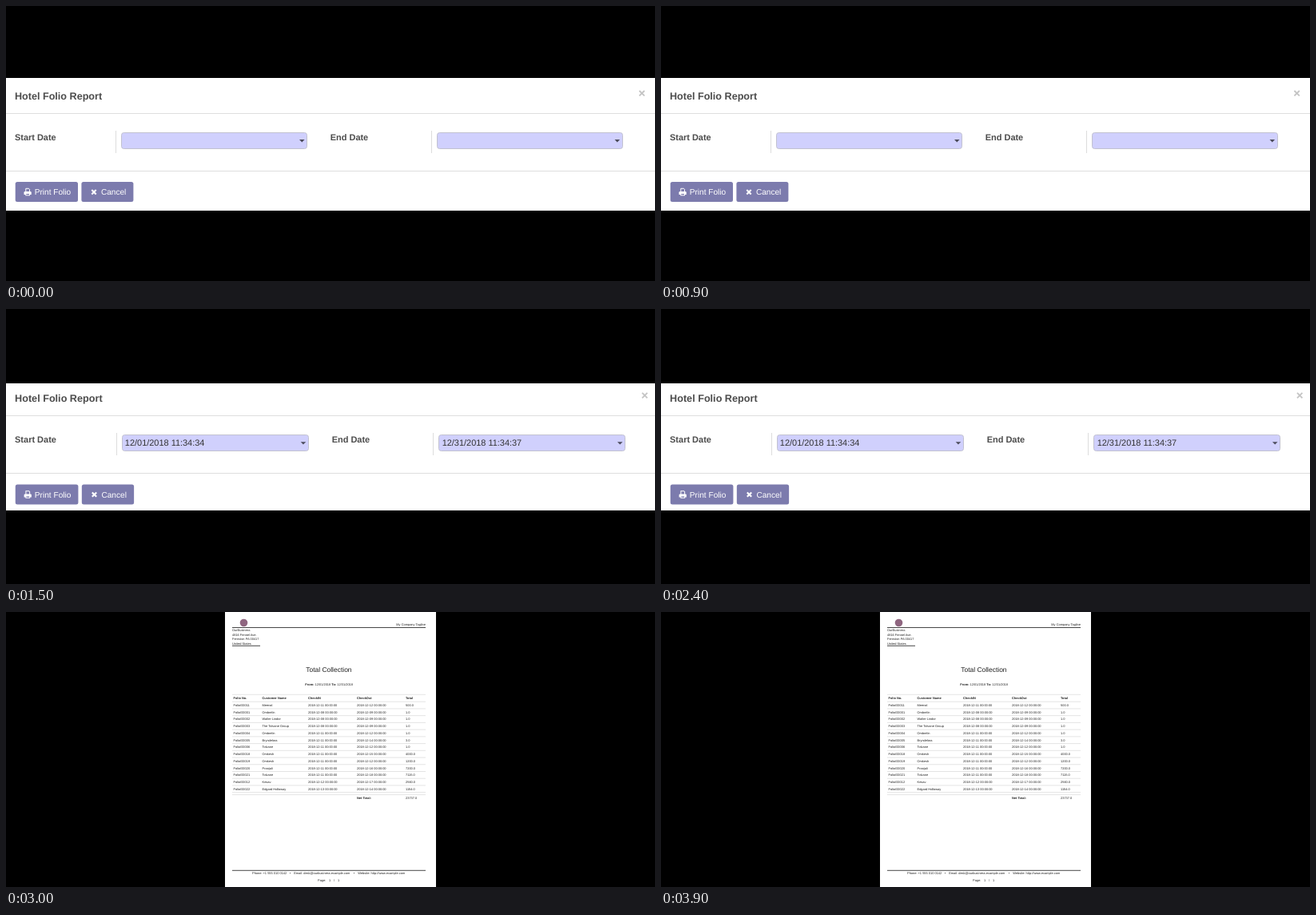
Animation, 812 px wide and 344 px high, one loop 4500 ms. Source, as an HTML page:

```html
<!DOCTYPE html>
<html lang="en">
<head>
<meta charset="utf-8">
<title>Hotel Folio Report</title>
<style>
  html, body { margin: 0; width: 100%; height: 100%; overflow: hidden; background: #000; }
  svg { display: block; width: 812px; height: 344px; }
  text { font-family: "Liberation Sans", Arial, sans-serif; text-rendering: geometricPrecision; white-space: pre; }
</style>
</head>
<body>
<svg id="stage" viewBox="0 0 812 344"></svg>
<script>
const stage = document.getElementById('stage');

const text = (x, y, size, str, fill, extra = '') =>
  `<text x="${x}" y="${y}" font-size="${size}" fill="${fill}" ${extra}>${str}</text>`;
const rect = (x, y, w, h, fill, extra = '') =>
  `<rect x="${x}" y="${y}" width="${w}" height="${h}" fill="${fill}" ${extra}/>`;
const path = (d, stroke, width = 1, fill = 'none') =>
  `<path d="${d}" stroke="${stroke}" stroke-width="${width}" fill="${fill}"/>`;
const cross = (x, y, r, color, width) =>
  path(`M${x - r} ${y - r}l${2 * r} ${2 * r}m0 ${-2 * r}l${-2 * r} ${2 * r}`, color, width);
const bold = 'font-weight="bold"';

// The dialog appears in two slightly different scales; hairlines snap to pixels.
function dialog({ scale, dy, top, bottom, start = '', end = '' }) {
  const X = v => v * scale, Y = v => v * scale + dy;
  const sx = v => Math.round(X(v)), sy = v => Math.round(Y(v));
  const ink = '#4c4c4c', accent = '#7c7bad';
  const label = (x, y, size, str, fill, extra) => text(X(x), Y(y), size * scale, str, fill, extra);
  const rule = y => rect(0, sy(y), 812, 1, '#dedede');

  const field = (labelX, lineX, left, right, name, value) => {
    const x = sx(left), y = sy(158);
    return label(labelX, 168, 10.95, name, ink, bold) +
      rect(sx(lineX), sy(156), 1, 28, '#dddddd') +
      rect(x + .5, y + .5, sx(right) - x - 1, sy(178) - y, '#d0d0fd', 'rx="3" stroke="#c2c2d0"') +
      label(left + 4.2, 172, 10.9, value, '#333') +
      path(`M${X(right - 10)} ${Y(167)}h6.6l-3.3 3.4z`, 'none', 0, '#4c4c5c');
  };
  const button = (x, w) => rect(X(x), Y(220), X(w), 25 * scale, accent, 'rx="2.5"');

  return rect(0, top, 812, bottom - top, '#fff') +
    label(11, 117, 12.6, 'Hotel Folio Report', ink, bold) +
    cross(X(795.6), Y(109.2), 3.2, '#c4c4c4', 1.8) +
    rule(134) + rule(206) +
    field(11, 137, 144, 377, 'Start Date', start) +
    field(405.8, 532, 539, 771.5, 'End Date', end) +
    button(11.7, 78.3) + button(94.4, 65) +
    `<g transform="translate(0 ${dy}) scale(${scale})">` +
      path('M24.8 232.5v-4.2h3.7l1 1v3.2', '#fff') +
      path('M22.5 236v-2.8q0-1.2 1.2-1.2h6.8q1.2 0 1.2 1.2v2.8z', 'none', 0, '#fff') +
      rect(24.8, 234.5, 4.7, 2.3, accent, 'stroke="#fff"') +
      cross(110, 232.7, 2.7, '#fff', 2.1) +
    '</g>' +
    label(35.7, 236.2, 10.1, 'Print Folio', '#fff') +
    label(118.9, 236.2, 10.1, 'Cancel', '#fff');
}

// folio, customer, check-in day, check-out day, total
const bookings = [
  [11, 'Meenal', 11, 12, 500], [1, 'Ombrelin', 8, 9, 1], [2, 'Walter Lindor', 8, 9, 1],
  [3, 'The Tolvane Group', 8, 9, 1], [4, 'Ombrelin', 11, 12, 1], [5, 'Bryndelora', 11, 14, 3],
  [6, 'Tolvane', 11, 12, 1], [18, 'Omkesh', 11, 15, 4000], [19, 'Omkesh', 11, 12, 1200],
  [20, 'Pranjali', 11, 16, 7200], [21, 'Tolvane', 11, 18, 7115], [12, 'Kesav', 12, 17, 2560],
  [22, 'Edgard Holloway', 13, 14, 1154]
];

function report() {
  const ink = '#222', size = 3.95, step = 8.73;
  const columns = [284.5, 320.5, 378, 439, 500];
  const small = (x, y, str, extra) => text(x, y, size, str, ink, extra);
  const row = (y, cells, extra) => cells.map((c, i) => small(columns[i], y, c, extra)).join('');
  const rule = (y, x2 = 525, color = '#333', width = .9) => path(`M283 ${y}H${x2}`, color, width);
  const faint = y => rule(y, 525, '#d2d2d2', .6);
  const pad = n => String(n).padStart(2, '0');
  const date = d => `2018-12-${pad(d)} 00:00:00`;
  const address = ['OurBusiness', '4816 Fennel Ave.', 'Fernston PA 00417', 'United States'];

  return rect(274, 0, 264, 344, '#fff') +
    '<circle cx="297.5" cy="13.5" r="4.8" fill="#8f6680"/>' +
    small(525, 16.6, 'My Company Tagline', 'text-anchor="end"') + rule(19.5) +
    address.map((line, i) => small(283, 24.2 + i * 5.5, line)).join('') + rule(42.3, 318) +
    text(375.3, 75, 8.45, 'Total Collection', ink) +
    small(374.3, 92.4, '<tspan font-weight="bold">From:</tspan> 12/01/2018 <tspan font-weight="bold">To:</tspan> 12/31/2018') +
    faint(103.3) +
    row(109, ['Folio No.', 'Customer Name', 'CheckIN', 'CheckOut', 'Total'], bold) +
    bookings.map(([id, name, from, to, total], i) =>
      faint(112.2 + i * step) +
      row(118 + i * step, ['Folio/000' + pad(id), name, date(from), date(to), total.toFixed(1)])
    ).join('') +
    faint(225.6) + faint(228.6) +
    small(439, 234.2, 'Net Total:', bold) + small(500, 234.4, '23737.0') +
    rule(323.3) +
    small(308, 328, 'Phone: +1 555 010 0142') + small(354.7, 328, '•') +
    small(360.2, 328, 'Email: desk@ourbusiness.example.com') + small(434.8, 328, '•') +
    small(440.2, 328, 'Website: http://www.example.com') +
    small(390, 336.6, 'Page:') + small(404, 336.6, '1') + small(410, 336.6, '/') + small(415, 336.6, '1');
}

const scenes = [
  dialog({ scale: 1, dy: 0, top: 90, bottom: 256 }),
  dialog({ scale: 1.0045, dy: -1.6, top: 93, bottom: 252, start: '12/01/2018 11:34:34', end: '12/31/2018 11:34:37' }),
  report()
];
stage.innerHTML = scenes.map(s => `<g>${s}</g>`).join('');

const groups = [...stage.children];
const t0 = performance.now();
function tick() {
  const current = Math.floor((performance.now() - t0) % 4500 / 1500);
  groups.forEach((g, i) => g.style.display = i === current ? '' : 'none');
  requestAnimationFrame(tick);
}
tick();
</script>
</body>
</html>
```
